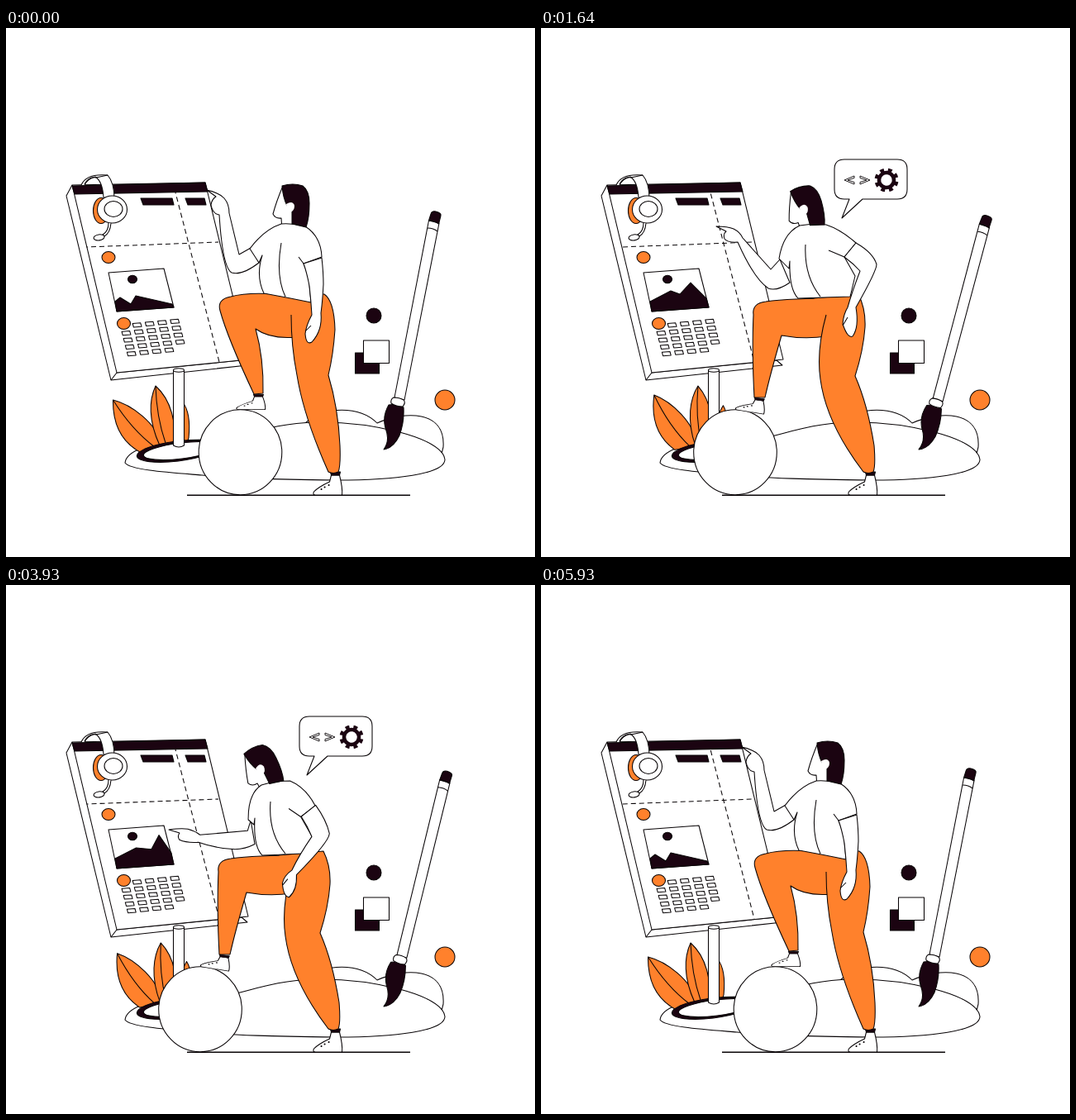
Animation of 640x640 px, one loop 6000 ms. Source, as an HTML page:

```html
<!DOCTYPE html>
<html lang="en">
<head>
<meta charset="utf-8">
<title>Designer at the board</title>
<style>
html, body { margin: 0; height: 100%; overflow: hidden; background: #fff; }
svg { display: block; width: 100vw; height: 100vh; }
svg * { stroke-linejoin: round; }
.o { fill: #ff812c; }
.k { fill: #1b0411; }
.n { fill: none; }
</style>
</head>
<body>
<svg viewBox="0 0 640 640" fill="#fff" stroke="#080406" stroke-width="1.05">
  <defs>
    <g id="shoe">
      <path d="M-5 0L-7 8Q-20 14 -26 20Q-28 24 -24 24L8 24Q9 16 5 0Z"/>
      <path class="k" d="M-6 -4L6 -4L5 0L-5 0Z"/>
      <path class="n" stroke-width="2" stroke-linecap="round" d="M-8 12h.1M-13 14.500h.1M-17 17h.1"/>
    </g>
  </defs>

  <path d="M362 478C385 457 428 457 449 478C482 463 532 462 529 507L527 515"/>
  <path d="M144 526C146 508 190 498 240 498C285 500 305 479 375 477C440 476 528 495 531 522C531 540 470 547 400 547C320 546 280 545 237 541C200 538 150 535 144 526Z"/>
  <circle class="k" cx="445" cy="348" r="9"/>
  <path class="k" d="M422.500 393h29v25h-29Z"/>
  <path d="M432.500 378h31v27.500h-31Z"/>
  <circle class="o" cx="531" cy="450" r="12"/>

  <g id="brush">
    <path d="M511.500 233L470 447L482 450L524 236Z"/>
    <path class="k" d="M514 225Q515 221 520 222Q527 224 526 227L523.500 237Q518 233 511.500 233Z"/>
    <path class="n" d="M510 242Q517 242 522 246"/>
    <path class="k" d="M463 456Q472 454 481 459Q482 477 476 493Q469 508 457 510Q465 499 459 484Q455 470 463 456Z"/>
    <path d="M469 447Q476 447 481 450Q484 453 480 458Q472 458 466 454Q465 449 469 447Z"/>
  </g>

  <g id="leaves">
    <path class="o" d="M204 505Q206 470 214 453Q224 466 221 496L218 505Z"/>
    <path class="o" d="M188 506C184 478 150 455 129.500 450C129 482 142 502 162 513Z"/>
    <path class="n" d="M129.500 450Q152 486 180 507"/>
    <path class="o" d="M186 505C172 475 173 450 181 433C200 450 207 480 202 502Z"/>
    <path class="n" d="M181 433Q182 470 193 502"/>
  </g>
  <ellipse class="k" cx="207" cy="512" rx="49" ry="12" transform="rotate(-7 207 512)"/>
  <ellipse cx="212" cy="511.500" rx="46" ry="9.500" transform="rotate(-7 212 511)"/>

  <path d="M80 190L73 203L127 426L292 408L285 402L134 417"/>
  <path d="M80 190L241 187L293 401L134 417Z"/>
  <path class="n" d="M127 426L134 417"/>
  <path class="k" d="M80 191L241 187L244 198L83 201ZM163 206L201 206L203 214L166 214ZM217 206L240 206L242 214L220 214Z"/>
  <path class="n dash" stroke-dasharray="6 4" d="M97.500 265L257 259"/>
  <path class="n dash" stroke-dasharray="6 4" d="M205 199L258 404"/>
  <ellipse class="o" cx="124" cy="277.500" rx="8" ry="7"/>
  <path d="M124 296L191 291L203 338L134 343Z"/>
  <ellipse class="k" cx="153" cy="304" rx="5.500" ry="4.800"/>
  <path class="k" id="hills"/>
  <path id="keys"/>
  <ellipse class="o" cx="142.500" cy="357.500" rx="8" ry="7"/>

  <path d="M91 190C96 178 112 177 123 178C130 186 131 196 131 207L118 205C117 190 113 183 108 180C100 182 97 186 95 190"/>
  <path class="n" d="M95 189C99 181 104 180 109 181L123 178"/>
  <ellipse class="o" cx="115" cy="221" rx="9.500" ry="15.500"/>
  <ellipse cx="128.500" cy="219.500" rx="18" ry="16.500"/>
  <ellipse cx="130" cy="219" rx="11" ry="9.500"/>
  <path d="M124 236Q124 246 117 250L119 252Q126 248 127 236"/>
  <ellipse cx="112.500" cy="253.500" rx="6.500" ry="3.500" transform="rotate(-8 112 253)"/>

  <path d="M202.500 414V505Q209 509 215.500 505V414"/>
  <ellipse cx="209" cy="414" rx="6.500" ry="2.200"/>
  <path stroke-width="1.400" d="M219 565.200H489"/>
  <ellipse id="ball" cy="513.200" rx="50.300" ry="51.500"/>

  <use href="#shoe" id="farShoe"/>
  <path class="o" id="farLeg"/>
  <use href="#shoe" transform="translate(398.500 541)"/>
  <path class="o" id="nearLeg"/>
  <path id="farArm"/>
  <g class="head"><path d="M335 191Q327 210 323 225Q326 231 333 230L334 245L350 245L352 195"/></g>
  <path id="shirt"/>
  <g class="head">
    <path class="k" d="M334 191Q347 187 359 191Q367 197 367 212Q367 230 363 241L346 237L346 221L340 215Q335 205 334 191Z"/>
    <path stroke="none" d="M339 213Q347 208 349 215Q349 221 344 223L340 222Z"/>
  </g>
  <path id="nearArm"/>

  <g id="bubble">
    <path d="M367 159H431Q443 159 443 171V195Q443 207 431 207H389L364 230L373 207H367Q355 207 355 195V171Q355 159 367 159Z"/>
    <g stroke-width=".9">
      <path id="lt" d="M379 179L367 184L379 189V186.500L371 184L379 181.500Z"/>
      <path id="gt" d="M386 179L398 184L386 189V186.500L394 184L386 181.500Z"/>
    </g>
    <g id="gear" class="n" stroke="#1b0411">
      <circle cx="418" cy="184" r="9" stroke-width="4.500"/>
      <circle cx="418" cy="184" r="12.500" stroke-width="4" pathLength="16" stroke-dasharray="1 1"/>
    </g>
  </g>
</svg>
<script>
const $ = id => document.getElementById(id);
const LOOP = 6000;

// Poses of each part, from standing back to leaning in.
const hills = [
  'M134 343L132 331L138 326L151 334L157 324L201 334L203 338Z',
  'M134 343L132 331L144 321L155 328L168 318L200 328L203 338Z',
  'M134 343L132 331L157 318L168 322L181 308L200 327L203 338Z',
  'M134 343L132 331L157 318L176 320L185 303L200 324L203 338Z',
  'M134 343L132 331L166 318L174 314L186 295L200 325L203 338Z'];
const farLeg = [
  'M362 326Q300 317 272 325Q255 328 259 342Q268 375 300 443L311 442Q312 400 302 364Q320 377 352 374',
  'M362 326Q300 321 272 326Q255 330 258 345Q263 375 284 445L296 446Q298 400 298 367Q320 377 352 374',
  'M362 327Q300 327 272 331Q255 333 257 347Q255 390 258 447L271 447Q277 420 291 372Q318 377 346 373'];
const nearLeg = [
  'M330 321L385 322Q397 330 398 365Q396 395 390 420Q402 460 404 505Q405 530 402 537Q396 540 390 537Q360 470 352 420Q345 385 345 347',
  'M330 324L388 327Q396 340 395 368Q393 395 386 420Q399 460 404 505Q405 530 402 537Q396 540 390 537Q356 478 349 430Q343 390 345 347',
  'M330 327L384 322Q393 340 392 362Q390 390 380 421Q395 455 403 505Q405 530 402 537Q396 540 390 537Q345 478 338 425Q333 390 345 347'];
const farShoe = [
  'translate(305.500 446) rotate(0) scale(1 .65)',
  'translate(289.500 449) rotate(2) scale(1 .65)',
  'translate(264 450.500) rotate(9) scale(1 .65)'];
const farArm = [
  'M243 196Q257 199 264 206Q270 213 270 224L282 274L298 265L306 284Q285 300 273 296Q262 290 258 226Q250 225 248 214Q249 207 254 204Z',
  'M231 212Q244 214 250 219Q257 224 260 232L279 276L292 268L302 288Q282 306 273 303Q262 292 250 236Q240 236 237 229Q237 223 240 219Z',
  'M212 240Q226 240 233 243Q241 247 244 254L278 292L289 280L301 308Q285 319 275 315Q258 304 238 259Q226 260 222 255Q220 249 224 246Z',
  'M204 264Q219 262 227 264Q234 267 237 271L286 295L293 283L301 312Q290 322 276 317Q255 306 232 280Q222 281 216 277Q214 272 217 268Z',
  'M195 305Q210 303 218 304Q227 306 234 311L294 298L297 285L301 314Q285 321 270 320Q250 321 233 320Q218 321 208 317Q205 313 208 309Z'];
const shirt = [
  'M333 237Q312 244 295 267L306 284L310 275Q302 300 312 321Q340 326 369 332L366 300L360 285L382 277Q381 252 362 240Q347 236 333 237ZM333 260Q326 300 338 325M360 285L354 277',
  'M323 239Q304 248 292 271L302 288L306 278Q300 304 312 324Q340 325 369 329L374 300L366 283L383 271Q373 247 356 239Q340 236 323 239ZM331 259Q322 295 338 325M366 283L350 268',
  'M313 239Q293 248 288 279L300 291L301 282Q300 316 311 327Q340 326 374 325L380 300L367 277L381 260Q363 244 345 238Q330 236 313 239ZM320 262Q318 300 338 325M367 277L348 269',
  'M309 242Q292 252 292 284L300 290L301 282Q299 316 310 327Q340 326 374 325L372 300L360 279L377 264Q363 245 344 237Q326 237 309 242ZM320 262Q317 300 338 325M360 279L345 269',
  'M309 242Q294 253 295 284L300 290L301 282Q299 316 310 327Q340 326 378 322L364 306L351 283L369 272Q362 245 343 237Q325 237 309 242ZM320 262Q317 300 338 325M351 283L337 273'];
const nearArm = [
  'M360 285L382 278Q384 296 384 310Q383 330 381 345Q383 366 370 380Q363 384 362 370Q363 360 370 347Q369 330 367 312Q364 296 360 285ZM362 367L369 360',
  'M366 283L383 271Q393 285 394 300Q393 312 383 343Q386 362 376 374Q369 377 366 358Q367 351 373 343Q375 325 377 302Q372 292 366 283ZM367 360L372 351',
  'M367 277L381 260Q402 272 406 286Q406 294 381 338Q385 362 377 373Q371 376 365 358Q366 346 371 338Q376 320 386 294Q378 285 367 277ZM365 360L371 350',
  'M360 279L377 264Q391 282 396 298Q396 306 360 350Q363 370 354 381Q347 381 345 362Q346 354 354 346Q358 328 375 302Q368 289 360 279ZM345 366L350 358',
  'M351 283L369 272Q380 291 380 307Q378 322 331 352Q327 367 315 370Q308 368 309 358Q313 346 327 342Q345 326 358 310Q356 296 351 283ZM310 356L319 350'];
const head = [
  'translate(363 241) rotate(0)', 'translate(356 239) rotate(-6)',
  'translate(343 238) rotate(-15.600)', 'translate(338.500 237.500) rotate(-22.500)',
  'translate(335 236.500) rotate(-27)'];

// Pose number over time; `back` is the pose reached early on the way back.
const bodyKeys = back => [[0, 0], [500, 1], [1400, 2], [1700, 2], [2500, 3], [3150, 4],
  [3450, 4], [4430, back], [4850, 2], [5420, 1], [5930, 0], [LOOP, 0]];
const legKeys = [[0, 0], [500, 1], [1250, 2], [4600, 2], [5400, 1], [5930, 0], [LOOP, 0]];
const ballKeys = [[0, 283.5], [500, 264], [1250, 235], [4600, 235], [5400, 264], [5930, 283.5], [LOOP, 283.5]];
const parts = [
  ['hills', hills, bodyKeys(2.02)], ['farLeg', farLeg, legKeys], ['nearLeg', nearLeg, legKeys],
  ['farArm', farArm, bodyKeys(3.25)], ['shirt', shirt, bodyKeys(2.4)], ['nearArm', nearArm, bodyKeys(2.3)]];
const headKeys = bodyKeys(3.2);

// Monotone cubic curve through [time, value] keys.
function curve(keys, t) {
  const rise = i => keys[i + 1] ? (keys[i + 1][1] - keys[i][1]) / (keys[i + 1][0] - keys[i][0]) : 0;
  const slope = i => {
    const a = i ? rise(i - 1) : 0, b = rise(i);
    return a * b > 0 ? 2 * a * b / (a + b) : 0;
  };
  let i = 0;
  while (i < keys.length - 2 && t >= keys[i + 1][0]) i++;
  const [t0, v0] = keys[i], [t1, v1] = keys[i + 1], d = t1 - t0, u = (t - t0) / d, w = 1 - u;
  return w * w * ((1 + 2 * u) * v0 + u * d * slope(i)) + u * u * ((3 - 2 * u) * v1 - w * d * slope(i + 1));
}

const number = /-?\d*\.?\d+/g;
function pose(list, p) {
  const i = Math.min(Math.floor(p), list.length - 2), f = p - i;
  const next = list[i + 1].match(number);
  let n = 0;
  return list[i].replace(number, a => (+a + (next[n++] - a) * f).toFixed(2));
}

let buttons = '';
for (let r = 0; r < 5; r++)
  for (let i = r ? 0 : 1; i < (r > 3 ? 4 : 5); i++)
    buttons += `M${138 + 15.2 * i + 2.1 * r} ${359 - 1.5 * i + 8.3 * r}l9.600 -.7l1.200 4.500l-9.600 .7Z`;
$('keys').setAttribute('d', buttons);

function draw(t) {
  for (const [id, list, keys] of parts) $(id).setAttribute('d', pose(list, curve(keys, t)));
  const tilt = pose(head, curve(headKeys, t)) + ' translate(-363 -241)';
  document.querySelectorAll('.head').forEach(g => g.setAttribute('transform', tilt));
  $('farShoe').setAttribute('transform', pose(farShoe, curve(legKeys, t)));
  $('ball').setAttribute('cx', curve(ballKeys, t));

  const sway = (1 - Math.cos(t / 3000 * 2 * Math.PI)) / 2;
  $('brush').setAttribute('transform', `rotate(${4 * sway} 458 510)`);
  $('leaves').setAttribute('transform', `rotate(${6.8 * sway} 185 510)`);
  document.querySelectorAll('.dash').forEach(p => p.setAttribute('stroke-dashoffset', t * .0024 - 5.5));

  const size = curve([[0, 0], [80, 0], [740, 1], [5220, 1], [5830, 0], [LOOP, 0]], t);
  $('bubble').setAttribute('transform', `translate(364 230) scale(${size}) translate(-364 -230)`);
  $('bubble').setAttribute('visibility', size > .01 ? 'visible' : 'hidden');
  $('gear').setAttribute('transform', `rotate(${t * .06} 418 184)`);
  $('lt').setAttribute('opacity', curve([[0, 1], [4330, 1], [4460, 0], [4600, 0], [4720, 1], [LOOP, 1]], t));
  $('gt').setAttribute('opacity', curve([[0, 1], [4240, 1], [4370, 0], [4700, 0], [4820, 1], [LOOP, 1]], t));
}

const start = performance.now();
function tick() {
  draw((performance.now() - start) % LOOP);
  requestAnimationFrame(tick);
}
tick();
</script>
</body>
</html>
```
